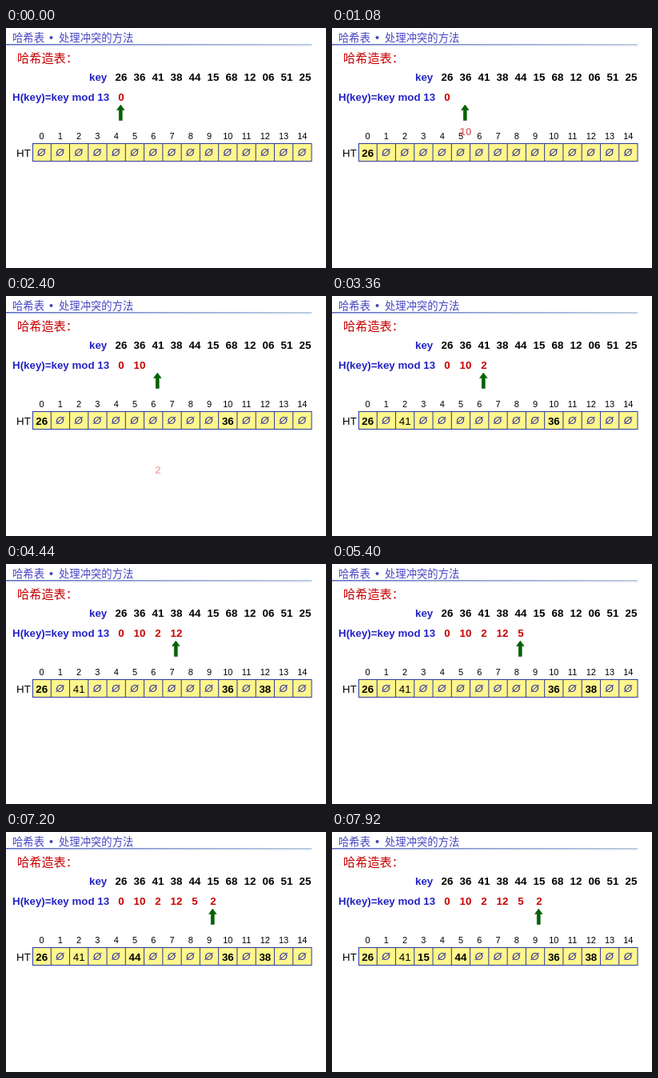
Recreate the animation shown at these times as an HTML page. Size 400 by 300 pixels, loop 8000 ms.

```html
<!DOCTYPE html>
<html lang="zh">
<head>
<meta charset="utf-8">
<title>哈希造表</title>
<style>
  html, body { margin: 0; width: 100%; height: 100%; overflow: hidden; background: #fff; }
  svg { display: block; width: 100vw; height: 100vh; font: 13.33px "Liberation Sans", Arial, sans-serif; }
  .cjk { font-family: "Noto Sans CJK SC", "Noto Sans CJK", sans-serif; }
  .bold { font-weight: bold; }
  .mid { text-anchor: middle; }
  .blue { fill: #2323c4; }
  .red { fill: #c80000; }
  .index { font-size: 11px; }
  .empty { font-style: italic; fill: #3434a4; }
</style>
</head>
<body>
<svg id="stage" viewBox="0 0 400 300">
  <defs>
    <linearGradient id="rule">
      <stop offset="0" stop-color="#4a5fc0"/>
      <stop offset="1" stop-color="#a9c3dc"/>
    </linearGradient>
  </defs>
  <rect width="400" height="300" fill="#fff"/>
  <g class="cjk" font-weight="300" fill="#4444c4">
    <text x="8" y="16.5">哈希表</text>
    <text x="66" y="16.5">处理冲突的方法</text>
    <circle cx="56.5" cy="12" r="2"/>
  </g>
  <rect y="20" width="382" height="1.5" fill="url(#rule)"/>
  <rect y="21.5" width="382" height="1" fill="#d5dce6"/>
  <text class="cjk red" x="14" y="42.5" font-size="15.2" font-weight="500">哈希造表：</text>
  <text class="bold blue" x="104" y="66">key</text>
  <text class="bold blue" x="8" y="91">H(key)=key mod 13</text>
  <text x="13" y="160.5">HT</text>
  <rect x="33.5" y="144.5" width="348.5" height="22" fill="#fff68c" stroke="#2c3a9c"/>
</svg>
<script>
const LOOP = 8000, STEP = 120, PITCH = 23, CELL = 349 / 15;
const KEY_Y = 66, HASH_Y = 91, CELL_Y = 160.5;
const keys = ["26", "36", "41", "38", "44", "15", "68", "12", "06", "51", "25"];

// Start times in ms of the arrow slide, the hash rise and the key's flight.
const inserts = [
  { cell: 0, fly: 60 },
  { cell: 10, slide: 740, rise: 974, fly: 1210 },
  { cell: 2, slide: 1960, rise: 2341, fly: 2840, plain: true },
  { cell: 12, slide: 3520, rise: 3740, fly: 3960 },
  { cell: 5, slide: 4560, rise: 4960, fly: 5400 },
  { cell: 3, slide: 6383, rise: 6720, fly: 7200 }
];
const SLIDE = 220, RISE = 200, FLY = 440;

const stage = document.getElementById("stage");
const keyX = i => 144 + PITCH * i;
const cellX = i => 33 + CELL * (i + 0.5);
const progress = (now, start, length) =>
  start === undefined ? 1 : Math.min(1, Math.max(0, (now - start) / length));
const ease = p => p < 0.5 ? 2 * p * p : 1 - 2 * (1 - p) ** 2;
const mix = (a, b, p) => a + (b - a) * p;

function add(tag, attrs, text = "") {
  const node = document.createElementNS("http://www.w3.org/2000/svg", tag);
  set(node, attrs);
  node.textContent = text;
  return stage.appendChild(node);
}

function set(node, attrs) {
  for (const name in attrs) node.setAttribute(name, attrs[name]);
}

const label = (text, x, y, style) => add("text", { x, y, class: "mid " + style }, text);

keys.forEach((key, i) => label(key, keyX(i), KEY_Y, "bold"));

const blanks = Array.from({ length: 15 }, (_, i) => {
  if (i) add("path", { d: `M${33 + CELL * i} 144V167`, stroke: "#2c3a9c" });
  label(i, cellX(i), 139, "index");
  return label("Ø", cellX(i) - 0.5, CELL_Y - 0.5, "empty");
});

const arrow = add("path", {
  d: "M0 96L4.8 102.5H2V115.5H-2V102.5H-4.8Z", fill: "#006400", stroke: "#004800", "stroke-width": 0.5
});

inserts.forEach((item, i) => {
  item.hash = label(Number(keys[i]) % 13, keyX(i), HASH_Y, "bold red");
  item.copy = label(keys[i], keyX(i), KEY_Y, item.plain ? "" : "bold");
});

// Rises from a full stage height below, overshoots slightly, then settles.
function riseOffset(p) {
  return 300 * (p < 0.9 ? 1.03 * (1 - p / 0.9) ** 2 - 0.03 : -0.03 * (1 - p) / 0.1);
}

function draw(now) {
  let arrowX = 143.3;
  inserts.forEach((item, i) => {
    if (i) arrowX += PITCH * ease(progress(now, item.slide, SLIDE));

    const risen = progress(now, item.rise, RISE);
    set(item.hash, { y: HASH_Y + riseOffset(risen), opacity: risen });

    const raw = progress(now, item.fly, FLY), flown = ease(raw);
    set(item.copy, {
      x: mix(keyX(i), cellX(item.cell), flown),
      y: mix(KEY_Y, CELL_Y, flown),
      opacity: raw > 0 ? 1 : 0
    });
    set(blanks[item.cell], { opacity: flown > 0.9 ? 0 : 1 });
  });
  set(arrow, { transform: `translate(${arrowX} 0)` });
}

const begin = performance.now();
function tick() {
  const now = (performance.now() - begin) % LOOP;
  draw(Math.floor(now / STEP) * STEP);
  requestAnimationFrame(tick);
}
tick();
</script>
</body>
</html>
```
